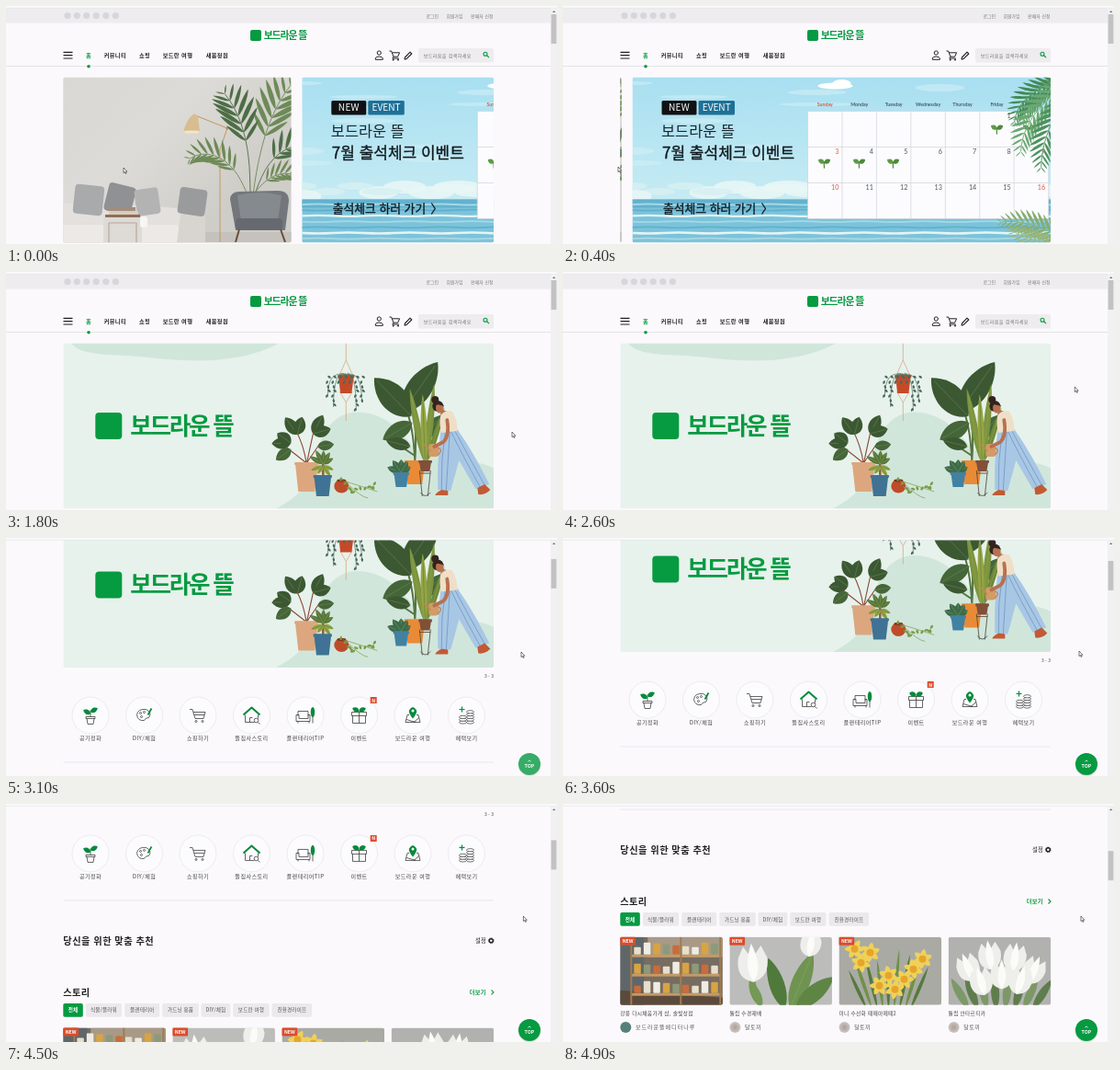
Recreate the animation shown at these times as an HTML page. Size 600 px wide and 259 px high, loop 5 s.

```html
<!DOCTYPE html>
<html lang="ko">
<head>
<meta charset="utf-8">
<title>Shop page walkthrough</title>
<style>
html, body { margin: 0; width: 100%; height: 100%; overflow: hidden; background: #fbf9fc; }
svg { display: block; width: 100%; height: 100%; }
text { font-family: "Noto Sans CJK KR", "Noto Sans CJK JP", "Noto Sans CJK", "Noto Sans KR", sans-serif; }
.latin { font-family: Lato, "Open Sans", sans-serif; }
.semi { stroke: #111a20; stroke-width: .35; }
</style>
</head>
<body>
<svg id="stage" viewBox="0 0 600 259"></svg>
<script>
const GREEN = '#069a41', INK = '#222', PITCH = 480.5;
const BRAND = '보드라운 뜰';

const rect = (x, y, w, h, fill, more = '') => `<rect x="${x}" y="${y}" width="${w}" height="${h}" fill="${fill}" ${more}/>`;
const circ = (x, y, r, fill, more = '') => `<circle cx="${x}" cy="${y}" r="${r}" fill="${fill}" ${more}/>`;
const oval = (x, y, rx, ry, fill, more = '') => `<ellipse cx="${x}" cy="${y}" rx="${rx}" ry="${ry}" fill="${fill}" ${more}/>`;
const path = (d, fill, more = '') => `<path d="${d}" fill="${fill}" ${more}/>`;
const line = (d, color = INK, w = 1, more = '') =>
  `<path d="${d}" fill="none" stroke="${color}" stroke-width="${w}" stroke-linejoin="round" ${more}/>`;
const text = (x, y, size, str, fill = INK, weight = 400, gap = 0, more = '') =>
  `<text x="${x}" y="${y}" font-size="${size}" fill="${fill}" font-weight="${weight}" letter-spacing="${gap}" ${more}>${str}</text>`;
const group = (x, y, body, more = '') => `<g transform="translate(${x} ${y})" ${more}>${body}</g>`;
const MID = 'text-anchor="middle"';

function leaf(x, y, len, wide, angle, fill, rib) {
  const vein = rib ? line(`M0 0H${len * .92}`, rib, .5) : '';
  return `<g transform="translate(${x} ${y}) rotate(${angle})">` +
    path(`M0 0C${len * .2} ${-wide} ${len * .7} ${-wide} ${len} 0C${len * .7} ${wide} ${len * .2} ${wide} 0 0Z`, fill) + vein + '</g>';
}

// Curved stem with paired leaflets
function frond(x, y, len, angle, droop, fill, bare = 0, n = 13) {
  let out = '', stem = `M${x} ${y}`;
  for (let i = 1; i <= n; i++) {
    const u = i / n, a = angle + droop * u * u, rad = a * Math.PI / 180;
    x += Math.cos(rad) * len / n;
    y += Math.sin(rad) * len / n;
    stem += `L${x.toFixed(1)} ${y.toFixed(1)}`;
    if (u < bare) continue;
    const size = len * .27 * Math.sin(Math.PI * (.25 + .65 * (u - bare) / (1 - bare)));
    out += leaf(x, y, size, size * .1, a + 42, fill) + leaf(x, y, size, size * .1, a - 42, fill);
  }
  return line(stem, fill, .9) + out;
}

function sprout(x, y, s = 1) {
  return `<g transform="translate(${x} ${y}) scale(${s})">` + line('M0 8Q-.6 3 0 0', '#4f8a3a', 1.3) +
    leaf(0, 2, 8, 3.6, -150, '#5d9c45') + leaf(0, 2, 8, 3.6, -30, '#4c8a3a') + '</g>';
}

// Slide 1: living room, flat tones
function roomSlide() {
  const green = '#6d8a58', dark = '#4d6e46';
  const cushion = (x, y, w, h, c, turn) => rect(x - w / 2, y - h / 2, w, h, c, `rx="4" transform="rotate(${turn} ${x} ${y})"`);
  const room = rect(-160, 77, 471, 181, 'url(#wall)') +
    rect(-160, 246, 471, 12, '#c5c1bc') +
    line('M233 257V156L241 133L206 119', '#c2a06a', 1.1) + circ(241, 133, 1.6, '#b48f55') +
    path('M205 117L209 120L211 136L193 138Q196 123 205 117Z', '#d8bd91') + oval(202, 137, 9, 1.6, '#f4e6c4') +
    frond(268, 212, 134, -82, 28, green, .5) + frond(266, 212, 122, -90, -36, dark, .5) +
    frond(270, 208, 104, -72, 105, dark, .42) + frond(264, 208, 88, -112, -95, green, .35) +
    frond(266, 210, 70, -55, 100, green, .35) +
    path('M244 210Q245 202 254 202L296 201Q308 201 308 212L304 244H250Z', '#73777c') +
    path('M252 206Q276 200 300 206L296 234H256Z', '#858a8f') +
    rect(250, 231, 51, 13, '#666a70', 'rx="4"') + line('M254 243L250 257M299 243L304 257', '#6b4e36', 2) +
    path('M-160 228Q50 205 206 222Q216 224 217 258H-160Z', '#e3e0dd') +
    rect(-160, 238, 348, 20, '#ece9e6', 'rx="4"') +
    path('M190 227Q213 222 217 230V258H186Z', '#d8d5d1') +
    cushion(90, 211, 32, 32, '#a9aaac', 6) + cushion(124, 210, 30, 31, '#8f9193', 14) +
    cushion(154, 213, 26, 29, '#b3b3b4', -8) + cushion(203, 213, 30, 29, '#999b9d', 8) +
    rect(108, 227, 38, 3, '#8f6d55') + rect(112, 223, 32, 4, '#d6cdc2') + rect(110, 219, 31, 4, '#a18d7d') +
    rect(106, 230, 42, 28, '#dedad5') + line('M112 258V236H142V258', '#b7a99b', 1.2) + rect(146, 229, 8, 12, '#f8f6f3', 'rx="3"');
  return group(PITCH - 260 - 62.3, 0, '') + group(220.5 - 62.3, 0, room);
}

// Slide 2: seaside attendance calendar
function calendarSlide() {
  const days = 'Sunday Monday Tuesday Wednesday Thursday Friday Saturday'.split(' ');
  const step = 37.45, left = 64, red = '#e0533a';
  let sky = rect(0, 77, 469, 135, 'url(#sky)');
  for (let i = 0; i < 16; i++)
    sky += oval((i * 67) % 469, 84 + (i * 41) % 100, 22 + (i * 13) % 20, 2 + i % 3, '#d4f1f6', 'opacity=".55"');
  for (let i = 0; i < 22; i++)
    sky += oval((i * 83) % 469, 196 + (i * 7) % 12, 16 + (i * 5) % 14, 4 + (i * 3) % 6, i % 3 ? '#e9f7f6' : '#d6f0f3', 'opacity=".85"');
  let sea = rect(0, 210.5, 469, 48, '#7cc3da') + rect(0, 210.5, 469, 9, '#62b1cf');
  for (let k = 0; k < 7; k++) {
    const y = 216 + k * 6.2;
    let d = `M0 ${y}`;
    for (let x = 0; x < 469; x += 67) d += `q17 ${k % 2 ? 1 : -1} 34 0t33 0`;
    sea += line(d, ['#a5d9e6', '#5fb0cf', '#e3f4f5'][k % 3], k % 3 == 2 ? 2.4 : 1.8);
  }
  const dark = '#111a20';
  const promo = rect(354, 103, 38, 15.5, '#101113', 'rx="1.5"') + rect(394, 103, 39.5, 15.5, '#1f7097', 'rx="1.5"') +
    text(373, 114.4, 10.2, 'NEW', '#fff', 400, .2, MID) + text(413.7, 114.4, 10.2, 'EVENT', '#fff', 400, -.1, MID) +
    text(353.5, 141.8, 16.4, BRAND, '#1b2730', 300) +
    text(354.5, 166, 17, '7월 출석체크 이벤트', dark, 400, 0, 'class="semi"') +
    text(355.5, 224.5, 12.8, '출석체크 하러 가기', dark, 400, 0, 'class="semi"') + line('M463 214.5L467 220.5L463 226.5', dark, 1.3);
  let cal = oval(94, 87, 19, 3.4, '#fff') + oval(101, 84, 10, 4, '#fff') + rect(left, 114.5, step * 7, 117, '#fcfcfe');
  let grid = '';
  for (let i = 0; i <= 7; i++) grid += `M${left + i * step} 114.5V231.5`;
  for (let j = 0; j <= 3; j++) grid += `M${left} ${114.5 + j * 39}H${left + 7 * step}`;
  cal += line(grid, '#cfd3d8', .7);
  days.forEach((d, i) => {
    cal += text(left + (i + .5) * step, 108.8, 5.2, d, i % 6 ? '#4d5b66' : red, 700, 0, `${MID} class="latin"`);
  });
  for (let n = 1; n <= 16; n++) {
    const cell = n + 4, col = cell % 7;
    cal += text(left + (col + 1) * step - 3.5, 122.3 + Math.floor(cell / 7) * 38.6, 7.2, n, col % 6 ? '#555' : red, 400, 0, 'text-anchor="end" class="latin"');
  }
  [[82, 169], [120, 169], [157, 169], [270, 132], [305, 132]].forEach(p => cal += sprout(p[0], p[1], .95));
  const palm = frond(345, 80, 70, -205, -55, '#5b9b66') + frond(346, 80, 78, 165, -65, '#438a58') +
    frond(345, 84, 92, 140, -45, '#69a872') + frond(348, 92, 90, 120, -28, '#4d9360') +
    frond(350, 258, 80, -150, -35, '#86ad70') + frond(348, 262, 66, -172, 22, '#9bb87b');
  return sky + sea + group(-322, 0, promo) + group(127, 0, cal + palm);
}

// Slide 3: brand and illustrated plants
function plantSlide() {
  const deep = '#3b5832', mid = '#55743b', lime = '#95a544', rib = '#6f8a58';
  const pot = (x, y, w, h, c) => path(`M${x} ${y}h${w}l${-w * .14} ${h}h${-w * .72}z`, c) + rect(x - .6, y, w + 1.2, 3, c, 'rx=".8"');
  const fan = (x, y, len, wide, angles, fill, vein) => angles.map((a, i) => leaf(x, y, len * (1 - (i % 3) * .13), wide, a, fill, vein)).join('');
  let s = rect(62, 77, 470, 181, '#e7f2ec') +
    path('M70 77C82 92 112 89 145 92C190 97 250 103 298 77Z', '#d1e6db') +
    path('M293 258C315 246 330 234 336 207C342 172 358 153 382 152.5C416 153 430 176 446 192C465 208 505 200 532 214V258Z', '#d1e6db') +
    rect(97, 153, 29, 29, GREEN, 'rx="4"') + text(135, 176.5, 25.6, BRAND, GREEN, 700, -2.3);

  s += line('M370 77V96L362 114M370 96L378 114M363 130L370 142L377 130M370 142V162', '#d8a987', .8) + pot(361.5, 112, 17, 20, '#c44a27');
  for (let i = 0; i < 7; i++) {
    const x = 350 + i * 6.2, drop = Math.abs(i - 3) > 1 ? 136 + (i * 11) % 20 : 119;
    s += line(`M370 112Q${x} 106 ${x} ${drop}`, '#52705e', .7);
    for (let y = 113; y <= drop; y += 5) s += leaf(x, y, 4.4, 1.6, 35 + (y * 37) % 110, '#48685a');
  }

  s += line('M327 209Q324 188 315 172M327 209Q332 185 336 168M327 208L304 190M327 208L342 186', '#8a4b3a', 1.1) + pot(314.5, 207, 25, 32, '#dca77e') +
    fan(317, 177, 23, 8.5, [-125, -75], deep, rib) + fan(310, 186, 21, 8.5, [178, 215], deep, rib) +
    fan(310, 193, 20, 8, [145], '#456639', rib) + fan(334, 176, 23, 8.5, [-62, -15], deep, rib) + fan(339, 190, 18, 7, [-8], '#456639', rib);
  s += line('M345 222V206', '#8a5a3c', 2.4) + fan(345, 209, 17, 3.4, [-150, -88, -30, -118, -60], mid, lime) +
    fan(345, 211, 14, 3, [160, 20, 125, 55], lime, mid) + pot(335, 221, 19, 23, '#3f7294');
  s += oval(365, 233, 8, 7.5, '#bd4c29') + oval(365, 227, 5, 1.4, '#7a3019');
  for (let i = 0; i < 13; i++) {
    const x = 364 + i * 3.2, y = 228 + 9 * Math.sin(i * .26) + i % 3;
    s += leaf(x, y, 5, 1.8, -80 + i * 47, '#7d9b4a');
  }
  s += line('M366 227Q380 231 404 239M370 229Q386 245 394 246', '#7d9b4a', .7);

  s += line('M445 205Q443 165 434 146M445 205Q448 165 440 142M445 200L424 186', '#56743f', 2) +
    leaf(432, 152, 66, 18, -55, deep, rib) + leaf(441, 157, 58, 19, -134, deep, rib) +
    leaf(442, 164, 37, 12, 150, '#456639', rib) + leaf(440, 190, 27, 9, 194, deep, rib) + leaf(449, 185, 40, 10, -48, '#456639', rib) +
    pot(434, 205, 22, 26, '#e98b36');
  s += fan(430, 218, 16, 5, [-160, -90, -30, -125, -60], '#3f6a48', '#69a078') + pot(422, 218, 16, 16, '#4281a1');
  s += leaf(455, 207, 82, 5, -101, '#7c9440', lime) + leaf(457, 207, 86, 5, -84, '#7c9440', lime) +
    leaf(456, 207, 74, 4.5, -92, lime, mid) + leaf(458, 207, 62, 4, -72, '#6d883b', lime) +
    pot(449.5, 205, 13.5, 12, '#805038') + line('M450 216L453 244M462 216L459 244M450 219H462M451 240Q456 247 462 240', '#4b4038', .8);

  const skin = '#b7714f';
  s += path('M473 173L491 171Q509 196 526 231L511 236L493 205L484 238L470 237Q469 204 473 173Z', '#a8c7e4') +
    line('M478 174Q473 205 474 237M483 173Q481 206 479 238M484 173Q496 198 516 234M488 172Q503 200 521 232', '#6f96c2', .8) +
    path('M474 237L481 238L481 243H467Q468 240 474 237Z', '#c15a36') + path('M513 235L521 231L527 237Q522 243 514 242Z', '#c15a36') +
    rect(473, 151, 6, 8, skin) + path('M473 156Q479 149 486 152Q492 164 491 173L474 175Q471 166 473 156Z', '#f0dfc8') +
    circ(467, 139, 4, '#33231f') + circ(470, 146, 6, '#33231f') + oval(472, 148, 4.3, 5.6, skin) + path('M466 144Q470 137 477 146Q471 144 466 144Z', '#33231f') +
    rect(460, 187, 11, 14, '#d29b67', 'rx="3"') + line('M462 195L454 187M470 191Q476 194 470 199', '#c18853', 1.4) +
    line('M480 161Q483 178 476 185L466 190', skin, 3.8, 'stroke-linecap="round"');
  return group(-62, 0, s);
}

function header() {
  let s = rect(0, 2, 593, 16.5, '#eeecef');
  [67, 77.3, 87.7, 98.2, 108.8, 119.4].forEach(x => s += circ(x, 10.5, 3.6, '#d8d6da'));
  s += text(457.5, 12.5, 4.9, '로그인', '#777') + text(479.5, 12.5, 4.9, '회원가입', '#777') + text(506, 12.5, 4.9, '판매자 신청', '#777', 400, .15);
  s += rect(266, 26, 12, 12, GREEN, 'rx="2"') + text(280.7, 36.2, 10.9, BRAND, GREEN, 700, -1.1);
  s += line('M62.5 50.3H72.5M62.5 53.7H72.5M62.5 57H72.5', INK, 1.2);
  [[87, '홈'], [106.7, '커뮤니티'], [145, '쇼핑'], [170.7, '보드란 여행'], [217.7, '새봄정원']].forEach(([x, label], i) =>
    s += text(x, 55.9, 6.2, label, i ? INK : GREEN, 700, .4));
  s += line('M0 65.5H593', '#dfdde1', .8) + circ(90, 65.7, 1.8, GREEN);
  s += circ(406.3, 51, 2.1, 'none', `stroke="${INK}"`) + line('M402.3 58.3V57Q402.6 55 406.3 55T410.3 57V58.3Z', INK, 1);
  s += line('M417.5 49H419.6L422 55.2H426.6L428.6 50.8H420.3M422 55.2L420.8 57H427.8', INK, 1) + circ(421.7, 58.6, 1, INK) + circ(427, 58.6, 1, INK);
  s += line('M434 58L434.4 56L440 50.2L441.8 52L436 57.6Z', INK, 1.1);
  s += rect(449, 46, 82, 15.5, '#eeecef', 'rx="1.5"') + text(454.7, 55.5, 5.1, '보드라움을 검색하세요', '#777', 400, .35);
  return s + circ(522, 52.2, 2, 'none', `stroke="${GREEN}" stroke-width="1.1"`) + line('M523.5 53.7L526 56.2', GREEN, 1.2);
}

function shortcuts() {
  const leafGreen = '#078a3c', thin = (d, w = .75) => line(d, '#333', w);
  const ring = (x, y, r) => circ(x, y, r, 'none', 'stroke="#333" stroke-width=".75"');
  const coin = (x, y) => oval(x, y, 4, 1.6, '#fff', 'stroke="#333" stroke-width=".7"');
  const art = [
    thin('M-5 2H5V4H-5ZM-4 4L-3 10H3L4 4M0 2V-5') + leaf(0, -1, 9, 3.4, -150, leafGreen) + leaf(0, -3, 9, 3.4, -30, leafGreen),
    thin('M5 3Q9 -3 2 -6Q-7 -7 -8 0Q-7 7 0 6Q1 3 5 3Z') + ring(-4, -2, 1) + ring(-3, 2, 1) + ring(0, -3, 1) + line('M4 0L8 -7', leafGreen, 1.8),
    thin('M-9 -6H-6L-3 4H6L8 -3H-5M-4 0H7') + ring(-2, 7, 1) + ring(5, 7, 1),
    thin('M-7 0V8H3M7 0V4M-2 8V3H1') + line('M-9 0L0 -8L9 0', leafGreen, 2) + ring(5, 6, 2.3) + thin('M7 8L9 10'),
    thin('M-8 1V-4H3V1M-10 0H-7V4H3V0H5V7H-10ZM-8 7V9M4 7V9M8 1V9') + oval(8, -3, 2.2, 5.6, leafGreen),
    thin('M-8 -3H8V1H-8ZM-7 1V9H7V1M0 -3V9') + leaf(0, -4, 8, 3.5, -155, leafGreen) + leaf(0, -4, 8, 3.5, -25, leafGreen),
    thin('M-4 0H-6L-8 8H8L6 0H4M-7 5L3 8M1 8L7 3') + path('M0 4Q-5 -2 -4 -5Q0 -12 4 -5Q5 -2 0 4Z', leafGreen) + circ(0, -4.5, 1.5, '#fff'),
    [0, 1, 2, 3, 4].map(i => coin(4, 8 - i * 2.8) + (i < 3 ? coin(-4, 8 - i * 2.8) : '')).join('') + line('M-5 -9V-3M-8 -6H-2', leafGreen, 1.2)
  ];
  const names = ['공기정화', 'DIY/체험', '쇼핑하기', '뜰집사스토리', '플랜테리어TIP', '이벤트', '보드라운 여행', '혜택보기'];
  let s = text(531, 152, 5, '3 - 3', '#444', 500, 0, 'text-anchor="end"');
  names.forEach((n, i) => {
    const x = 92 + i * 58.5;
    s += circ(x, 193, 20, '#fcfbfd', 'stroke="#e6e4e9" stroke-width=".7"') + group(x, 192.5, art[i]) + text(x, 220.3, 6.1, n, '#444', 400, .45, MID);
  });
  s += rect(396.7, 173, 7, 7, '#dc4a2c') + text(400.2, 178.5, 5.2, 'N', '#fff', 700, 0, MID);
  return s + line('M62.5 244H531', '#e5e3e7', .8);
}

function storyHead() {
  let s = text(62.3, 174.8, 10.2, '당신을 위한 맞춤 추천', INK, 700, .5) + text(511, 173.4, 6.3, '설정', INK, 500, .3) +
    circ(528.3, 170.8, 2, 'none', `stroke="${INK}" stroke-width="1.4"`) +
    circ(528.3, 170.8, 2.8, 'none', `stroke="${INK}" stroke-width="1" stroke-dasharray="1.1 1.1"`) +
    text(62.3, 230.8, 10.2, '스토리', INK, 700, .3) + text(504.7, 229.4, 6.2, '더보기', GREEN, 700, .4) + line('M528.5 224.5L531 227L528.5 229.5', GREEN, 1.1);
  const chips = [['전체', 62.3, 21.5], ['식물/플라워', 87, 39], ['플랜테리어', 129.3, 38], ['가드닝 용품', 170.3, 39.5],
    ['DIY/체험', 212.5, 32], ['보드란 여행', 247.3, 39.3], ['친환경라이프', 289.6, 43.5]];
  chips.forEach(([n, x, w], i) => {
    s += rect(x, 239, w, 14.8, i ? '#ebe9ec' : GREEN, 'rx="1.8"') + text(x + w / 2, 248.5, 5.6, n, i ? '#555' : '#fff', i ? 400 : 700, .15, MID);
  });
  return s;
}

function tulip(x, y, s, turn = 0) {
  return `<g transform="translate(${x} ${y}) rotate(${turn}) scale(${s})">` +
    path('M0 12Q-13 9 -10 -6L-6 -14L0 -5L7 -14L11 -5Q12 9 0 12Z', '#eeeeea') + path('M0 12Q-7 2 0 -16Q8 2 0 12Z', '#fbfbf8') + '</g>';
}

function photos() {
  let shop = rect(0, 0, 112, 74, '#776c61') + rect(0, 0, 26, 74, '#5f666a') + rect(30, 0, 82, 22, '#a89a87') + path('M0 58L112 66V74H0Z', '#5b4a3c');
  const tones = ['#e7dfcb', '#d8a443', '#c96c3b', '#efece4', '#8d9a7a'];
  for (let r = 0; r < 3; r++) {
    shop += rect(12, 19 + r * 21, 98, 3, '#c49a66');
    for (let i = 0; i < 9; i++) {
      const h = 8 + (i * 5 + r * 3) % 6;
      shop += rect(15 + i * 10.5, 19 + r * 21 - h, 7.5, h, tones[(i * 3 + r) % 5], 'rx="1"');
    }
  }
  shop += line('M12 0V74M66 0V74M109 0V74', '#a17b50', 2);

  const duo = rect(0, 0, 112, 74, '#bcbdbb') + line('M25 42Q29 60 33 76M87 18Q82 45 74 76', '#7a9a54', 3) +
    leaf(66, 78, 66, 13, -68, '#6f9350', '#8cab6b') + leaf(60, 78, 58, 11, -108, '#4f7a3b') + leaf(72, 78, 54, 12, -40, '#5f8545') +
    leaf(35, 76, 32, 7, -115, '#749855') + tulip(25, 31, 1.5, -4) + tulip(88, 9, 1.05, 8);

  let gold = rect(0, 0, 112, 74, '#a9aaa3');
  for (let i = 0; i < 9; i++) gold += leaf(30 + i * 6, 78, 46 + (i * 17) % 22, 2.5, -115 + i * 6, i % 2 ? '#71904a' : '#557a3d');
  for (let i = 0; i < 9; i++) {
    const x = 17 + (i * 37) % 84, y = 13 + (i * 29) % 47;
    for (let a = 0; a < 6; a++) gold += leaf(x, y, 11, 4, a * 60 + i * 20, '#f0d158');
    gold += circ(x, y, 4, '#e5a52b');
  }

  let white = rect(0, 0, 112, 74, '#b1b2b0');
  for (let i = 0; i < 8; i++) white += leaf(22 + i * 10, 78, 38, 6, -120 + i * 9, i % 2 ? '#5f7d4c' : '#7d9867');
  [[22, 35, -22], [45, 22, -8], [72, 24, 8], [92, 38, 24], [58, 43, 0], [36, 50, -15], [78, 49, 15]].forEach(p => white += tulip(p[0], p[1], 1.15, p[2]));
  return [shop, duo, gold, white];
}

function cards() {
  const titles = ['강릉 다시채움가게 샵, 솔빛상점', '튤립 수경재배', '미니 수선화 떼떼아떼떼2', '튤립 안타르티카'];
  return photos().map((art, i) => {
    const x = 62.3 + i * 119.1;
    let s = group(x, 144.7, `<g clip-path="url(#card)">${art}</g>`);
    if (i < 3) s += rect(x, 144.7, 16.7, 9, '#d94d2d', 'rx="1"') + text(x + 8.3, 151.3, 5.2, 'NEW', '#fff', 700, 0, MID);
    s += text(x, 230.3, 5.7, titles[i], '#444', 400, .3);
    s += circ(x + 6, 243, 6, i ? 'url(#face)' : '#55807a');
    return s + text(x + 16.7, 245.3, 6, i ? '달토끼' : '보드라운뜰에디터나루', '#555', 400, i ? .4 : 1);
  }).join('');
}

const slides = [roomSlide(), calendarSlide(), plantSlide()];
const stage = document.getElementById('stage');
stage.innerHTML = `<defs>
  <linearGradient id="wall" x2="1" y2=".4"><stop stop-color="#d5d3cf"/><stop offset=".7" stop-color="#dddbd7"/><stop offset="1" stop-color="#cfcdc8"/></linearGradient>
  <linearGradient id="sky" x2="0" y2="1"><stop stop-color="#a8dff1"/><stop offset="1" stop-color="#c6ebf3"/></linearGradient>
  <radialGradient id="face"><stop stop-color="#b09c94"/><stop offset="1" stop-color="#c9c7c5"/></radialGradient>
  <clipPath id="view"><rect x="62.3" y="77.6" width="468.75" height="180" rx="2"/></clipPath>
  <clipPath id="slide"><rect y="77.6" width="468.75" height="180" rx="2"/></clipPath>
  <clipPath id="card"><rect width="111.5" height="74" rx="2.5"/></clipPath></defs>` +
  rect(0, 0, 600, 259, '#fbf9fc') +
  `<g id="page">${header()}<g clip-path="url(#view)"><g id="strip">` +
  slides.map((s, i) => group(i * PITCH, 0, s, 'clip-path="url(#slide)"')).join('') + '</g></g>' +
  group(0, 116.5, shortcuts()) + group(0, 233.5, storyHead()) + group(0, 354.5, cards()) + '</g>' +
  rect(0, 0, 600, 2, '#fbfafc') + line('M0 2.2H600', '#e4e2e6', .7) +
  rect(593, 2.5, 7, 257, '#f1f0f2') + path('M595 7L596.7 5L598.4 7Z', '#777') + rect(593.6, 9, 5.8, 32, '#c2c1c3', 'id="thumb"') +
  `<g id="top">${circ(570, 247, 12.4, '#000', 'opacity=".1"')}${circ(570, 246, 12, GREEN)}${line('M568.4 243.3L570 241.9L571.6 243.3', '#fff', .8)}${text(570, 249.8, 5.4, 'TOP', '#fff', 700, 0, MID)}</g>` +
  `<g id="cursor">${path('M0 0V5.6L1.3 4.5L2.2 6.5L3.1 6.1L2.2 4.2H3.9Z', '#fff', 'stroke="#222" stroke-width=".6"')}</g>`;

const part = id => document.getElementById(id);
const page = part('page'), strip = part('strip'), thumb = part('thumb'), topBtn = part('top'), cursor = part('cursor');
const clamp = v => Math.max(0, Math.min(1, v));
const smooth = u => u * u * (3 - 2 * u);
const easeOut = u => 1 - (1 - u) ** 3;
const ramp = (t, from, to, ease = smooth) => ease(clamp((t - from) / (to - from)));

// Keys: [time, x, y]
const trail = [[0, 128, 176], [200, 36, 177], [400, 60, 175], [850, 356, 162], [1100, 167, 163], [1250, 92, 165], [1400, 120, 167],
  [1800, 551, 174], [2000, 551, 174], [2500, 557, 125], [3100, 561, 124], [4100, 563, 122], [5000, 564, 122]];

function pointer(t) {
  const i = trail.findIndex(k => k[0] > t), a = trail[i - 1], b = trail[i];
  const u = smooth((t - a[0]) / (b[0] - a[0]));
  return [a[1] + (b[1] - a[1]) * u, a[2] + (b[2] - a[2]) * u];
}

// The strip follows the pointer while dragged, then snaps to the next slide
function stripShift(t, x) {
  const snap = (from, to, start) => from + (to - from) * ramp(t, start, start + 350, easeOut);
  if (t <= 200) return 220.5 + 128 - x;
  if (t < 850) return snap(312.5, PITCH, 200);
  if (t <= 1250) return PITCH + 356 - x;
  return snap(PITCH + 264, 2 * PITCH, 1250);
}

function draw(t) {
  const [x, y] = pointer(t);
  const scroll = 116.5 * ramp(t, 2700, 3100) + 117 * ramp(t, 3480, 3980) + 121 * ramp(t, 4350, 4900);
  page.setAttribute('transform', `translate(0 ${-scroll})`);
  strip.setAttribute('transform', `translate(${62.3 - stripShift(t, x)} 0)`);
  thumb.setAttribute('y', 9 + scroll * .119);
  topBtn.setAttribute('opacity', clamp((t - 2780) / 400));
  cursor.setAttribute('transform', `translate(${x} ${y})`);
}

const start = performance.now();
function tick() {
  const t = (performance.now() - start) % 5000;
  draw(Math.floor(t / 100) * 100);
  requestAnimationFrame(tick);
}
tick();
</script>
</body>
</html>
```
